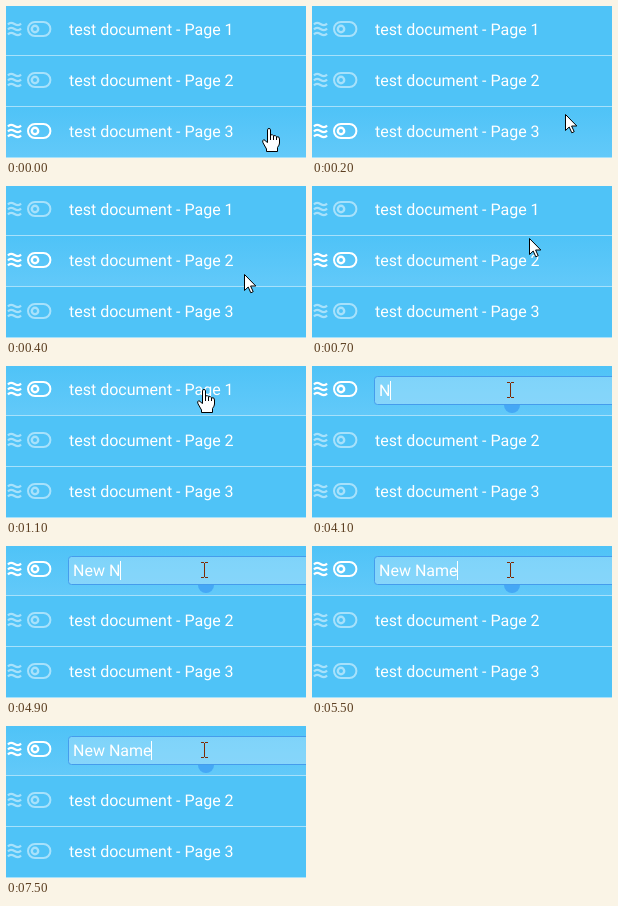
Recreate the animation shown at these times as an HTML page with a canvas. Size 300x152 px, loop 8000 ms.

```html
<!DOCTYPE html>
<html lang="en">
<head>
<meta charset="utf-8">
<title>Rename a page</title>
<style>
  html, body { margin: 0; width: 100%; height: 100%; overflow: hidden; background: #4fc3f7; }
  canvas { display: block; width: 300px; height: 152px; }
</style>
</head>
<body>
<canvas id="stage" width="300" height="152"></canvas>
<script>
const ctx = document.getElementById('stage').getContext('2d');
const LOOP = 8000, ROW = 51;
const EDIT_START = 2100, TYPE_START = 4100, KEY_TIME = 200, TYPE_END = 5500;
const NEW_NAME = 'New Name';

// Fractional glyph advances, as in page text
ctx.textRendering = 'geometricPrecision';
ctx.font = '16px Roboto, sans-serif';

// Pointer tip every 100 ms
const trail = [
  [263, 122], [259, 116], [253, 108], [246, 98], [238, 88], [231, 76],
  [224, 64], [217, 52], [210, 41], [205, 33], [197, 27], [198, 23]
];

const handShape = new Path2D(
  'M-1.5 10V1.8Q-1.5 .5 0 .5T1.5 1.8V7Q3.8 5.9 4.5 7.8Q6.8 6.8 7.5 8.8' +
  'Q10.5 8 10.5 11V15Q10.5 17 8.5 19.5V23.5H-2.5V21L-6 14.8Q-7 12.5-5.5 11.8' +
  'Q-4 11.5-2.5 14L-1.5 14.5Z');
const handLines = new Path2D('M1.5 7V12M4.5 8V12M7.5 9V12');
const arrowShape = new Path2D('M.5 .5V16.5L4.2 13L6.8 18.8L9.2 17.7L6.6 12H11.8Z');
const wave = new Path2D('M2 .5C3.8-1.8 5.8-1.6 8.5 0S13.2 1.8 15-.5');

function roundRect(x, y, w, h, r) {
  ctx.beginPath();
  ctx.roundRect(x, y, w, h, r);
}

function label(text, x, y) {
  ctx.fillStyle = '#fff';
  ctx.fillText(text, x, y);
}

function drawIcons(top, active) {
  ctx.save();
  ctx.globalAlpha = active ? 1 : 0.5;
  ctx.strokeStyle = '#fff';
  ctx.lineWidth = 2.2;
  ctx.translate(0, top);
  for (const y of [18, 23, 28]) {
    ctx.save();
    ctx.translate(0, y);
    ctx.stroke(wave);
    ctx.restore();
  }
  ctx.lineWidth = 2;
  roundRect(22, 16, 22.4, 14, 7);
  ctx.stroke();
  ctx.lineWidth = 2.4;
  ctx.beginPath();
  ctx.arc(29, 23, 3.2, 0, Math.PI * 2);
  ctx.stroke();
  ctx.restore();
}

function drawRow(index, active, editing) {
  const border = index * ROW + 49;
  const top = Math.max(0, border - 50);
  if (active) {
    const glow = ctx.createLinearGradient(0, top, 0, border);
    glow.addColorStop(0, '#4fc3f7');
    glow.addColorStop(1, '#62c9f9');
    ctx.fillStyle = glow;
    ctx.fillRect(0, top, 300, border - top);
  }
  drawIcons(index * ROW, active);
  if (!editing) label(`test document - Page ${index + 1}`, 63, index * ROW + 29);
  ctx.fillStyle = '#a7e1fb';
  ctx.fillRect(0, border, 300, 1);
}

function drawEditor(t) {
  ctx.fillStyle = '#45a8f5';
  ctx.beginPath();
  ctx.arc(200, 39, 8, 0, Math.PI);
  ctx.fill();

  roundRect(62.5, 10.5, 250, 28, 3);
  ctx.fillStyle = 'rgba(255,255,255,0.25)';
  ctx.fill();
  ctx.strokeStyle = '#459cec';
  ctx.lineWidth = 1;
  ctx.stroke();

  if (t < TYPE_START) {
    const text = 'test document - Page 1';
    ctx.fillStyle = '#1a80ee';
    ctx.fillRect(67, 15, Math.floor(ctx.measureText(text).width), 19);
    label(text, 67, 30);
  } else {
    const count = Math.floor((t - TYPE_START) / KEY_TIME) + 1;
    const text = NEW_NAME.slice(0, count);
    label(text, 67, 30);
    const caretOn = t < TYPE_END || Math.floor((t - TYPE_END) / 1000) % 2 === 0;
    if (caretOn) ctx.fillRect(67 + Math.floor(ctx.measureText(text).width), 15, 1, 19);
  }
}

// The text cursor inverts whatever lies under it
function drawBeam() {
  ctx.save();
  ctx.globalCompositeOperation = 'difference';
  ctx.fillStyle = '#fff';
  ctx.fillRect(198, 17, 1, 14);
  for (const y of [16, 31]) {
    ctx.fillRect(195, y, 3, 1);
    ctx.fillRect(199, y, 3, 1);
  }
  ctx.restore();
}

function drawPointer(x, y) {
  const offset = (y + 1) % ROW;
  const overText = offset > 13 && offset < 37;
  const shape = overText ? handShape : arrowShape;
  ctx.save();
  ctx.translate(x, y);
  ctx.fillStyle = '#fff';
  ctx.strokeStyle = '#000';
  ctx.lineWidth = 1;
  ctx.lineJoin = 'round';
  ctx.fill(shape);
  ctx.stroke(shape);
  if (overText) ctx.stroke(handLines);
  ctx.restore();
}

function draw(t) {
  const [x, y] = trail[Math.min(Math.floor(t / 100), trail.length - 1)];
  const hovered = Math.floor((y + 1) / ROW);
  const editing = t >= EDIT_START;

  ctx.fillStyle = '#4fc3f7';
  ctx.fillRect(0, 0, 300, 152);
  for (let i = 0; i < 3; i++) drawRow(i, i === hovered, editing && i === 0);
  if (editing) {
    drawEditor(t);
    drawBeam();
  } else {
    drawPointer(x, y);
  }
}

const start = performance.now();
function tick() {
  draw((performance.now() - start) % LOOP);
  requestAnimationFrame(tick);
}
tick();
</script>
</body>
</html>
```
